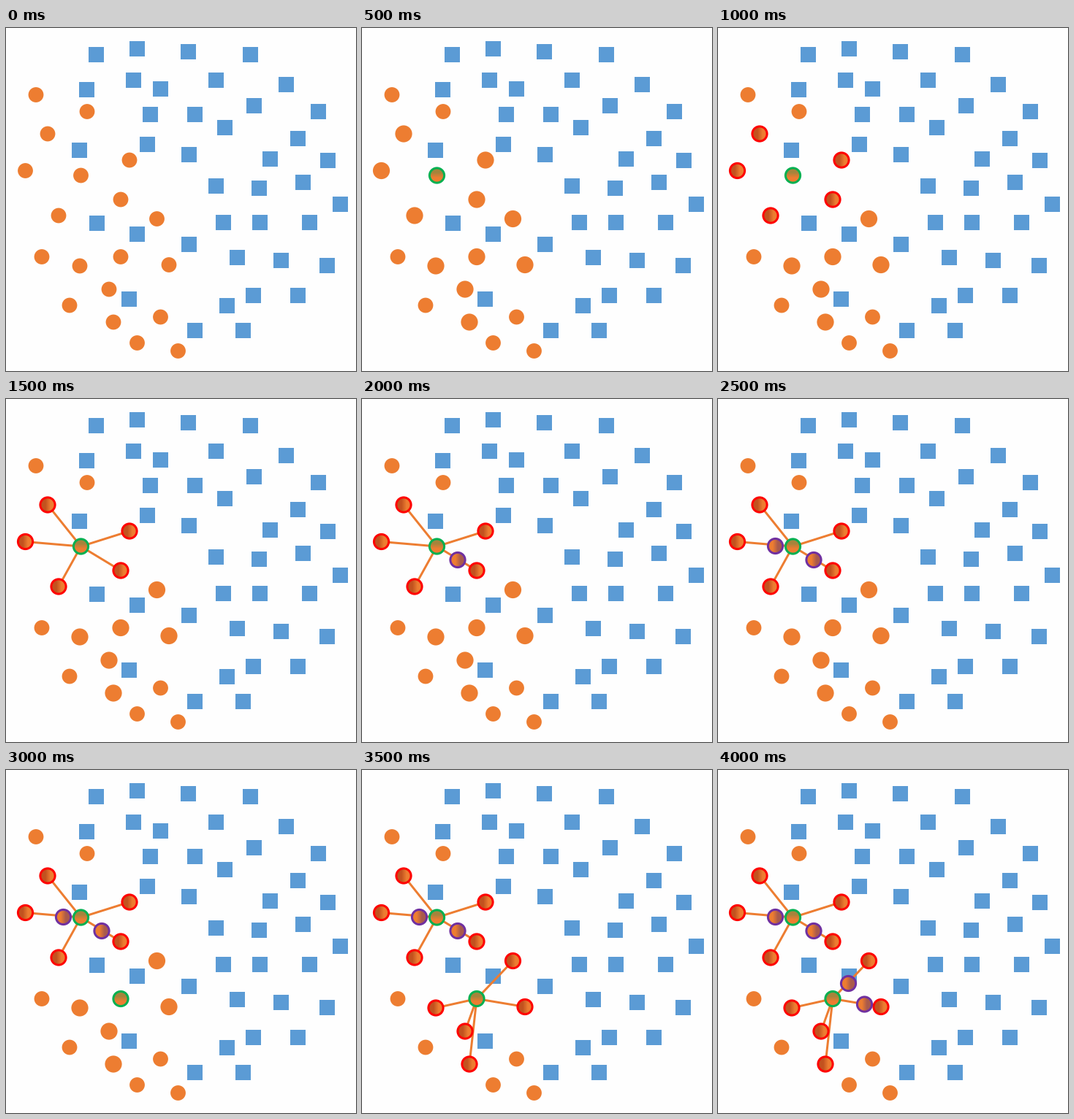
Animation of 479x470 px, one loop 4500 ms. Source, as a matplotlib script:

```python
import numpy as np
import matplotlib.pyplot as plt
from matplotlib.animation import FuncAnimation
from matplotlib.colors import LinearSegmentedColormap
from matplotlib.patches import Circle, Rectangle

W, H, DPI = 479, 470, 128
PX = 72 / DPI  # points per pixel
STEP_MS, STEPS = 500, 9

BLUE, ORANGE = "#5b9bd5", "#ed7d31"
RED, GREEN, PURPLE = "#ff0000", "#00b050", "#7030a0"
SIDE, R_SMALL, R_BIG = 21, 10.4, 11.6

MAJORITY = [
    (123.5, 36.5), (179.5, 28), (250, 32.5), (334.5, 36), (175, 71.5),
    (111, 84), (211.5, 83.5), (287.5, 71.5), (384, 77), (340, 106),
    (427.5, 114), (198, 118), (258.5, 118), (300, 136), (399.5, 151),
    (193.5, 159), (101, 167.5), (251, 173.5), (361.5, 179.5), (440.5, 181.5),
    (287.5, 216.5), (347, 219), (407, 211.5), (458, 241), (124.5, 267),
    (179.5, 282), (297.5, 266), (348, 266), (415.5, 266), (251, 296),
    (316.5, 314), (376.5, 318), (440, 325.5), (169, 371), (303, 380),
    (338.5, 366), (399.5, 366.5), (258.5, 414.5), (324.5, 414),
]
LONERS = [(41, 91.5), (111, 114.5), (49, 313.5), (87, 380),
          (211.5, 396), (179.5, 431.5), (235.5, 442.5)]

# Each cluster: seed, neighbours, synthetic points, and the steps they appear
CLUSTERS = [
    dict(seed=(102.5, 202),
         near=[(57, 145), (26.5, 195.5), (169, 181), (157, 235), (72, 257)],
         new=[(131, 220.5), (78.5, 201.5)],
         seed_at=1, near_at=2, lines_at=3, new_at=[4, 5]),
    dict(seed=(157, 313.5),
         near=[(206.5, 261.5), (101, 326), (223, 324.5), (141, 358),
               (147, 403)],
         new=[(178.5, 292.5), (200.5, 321)],
         seed_at=6, near_at=7, lines_at=7, new_at=[8, 8]),
]


def fade(first, last):
    return LinearSegmentedColormap.from_list("", [first, first, last, last])


FILLS = {
    RED: (fade("#c2521f", ORANGE), False),
    GREEN: (fade("#a5843c", ORANGE), True),
    PURPLE: (fade(ORANGE, "#a95a4c"), False),
}

fig = plt.figure(figsize=(W / DPI, H / DPI), dpi=DPI, facecolor="#fefefe")
ax = fig.add_axes([0, 0, 1, 1])
ax.axis("off")

timed = []  # (artist, first step, step after the last)


def show(artist, start=0, stop=STEPS):
    timed.append((artist, start, stop))


def dot(center, radius, start=0, stop=STEPS):
    show(ax.add_patch(Circle(center, radius, fc=ORANGE, lw=0, zorder=3)),
         start, stop)


def ringed(center, color, start, z):
    x, y = center
    cmap, vertical = FILLS[color]
    ramp = np.linspace(0, 1, 64)
    ramp = ramp[:, None] if vertical else ramp[None, :]
    r = R_BIG - 1.5
    fill = ax.imshow(ramp, cmap=cmap, extent=(x - r, x + r, y + r, y - r),
                     aspect="auto", zorder=z)
    fill.set_clip_path(Circle(center, r, transform=ax.transData))
    ring = ax.add_patch(Circle(center, r, fill=False, ec=color,
                               lw=3 * PX, zorder=z + 0.1))
    show(fill, start)
    show(ring, start)


for x, y in MAJORITY:
    ax.add_patch(Rectangle((x - SIDE / 2, y - SIDE / 2), SIDE, SIDE,
                           fc=BLUE, lw=0, zorder=1))

for p in LONERS:
    dot(p, R_SMALL)

for c in CLUSTERS:
    for p in [c["seed"]] + c["near"]:
        ringed_at = c["seed_at"] if p == c["seed"] else c["near_at"]
        dot(p, R_SMALL, 0, 1)
        dot(p, R_BIG, 1, ringed_at)
    for p in c["near"]:
        line, = ax.plot(*zip(c["seed"], p), color=ORANGE, lw=3 * PX, zorder=2)
        show(line, c["lines_at"])
        ringed(p, RED, c["near_at"], 4)
    for p, start in zip(c["new"], c["new_at"]):
        ringed(p, PURPLE, start, 5)
    ringed(c["seed"], GREEN, c["seed_at"], 6)

ax.set_xlim(0, W)
ax.set_ylim(H, 0)


def draw(step):
    for artist, start, stop in timed:
        artist.set_visible(start <= step < stop)
    return [artist for artist, _, _ in timed]


anim = FuncAnimation(fig, draw, frames=STEPS, interval=STEP_MS,
                     init_func=lambda: draw(0), repeat=True, repeat_delay=0)
plt.show()
```
